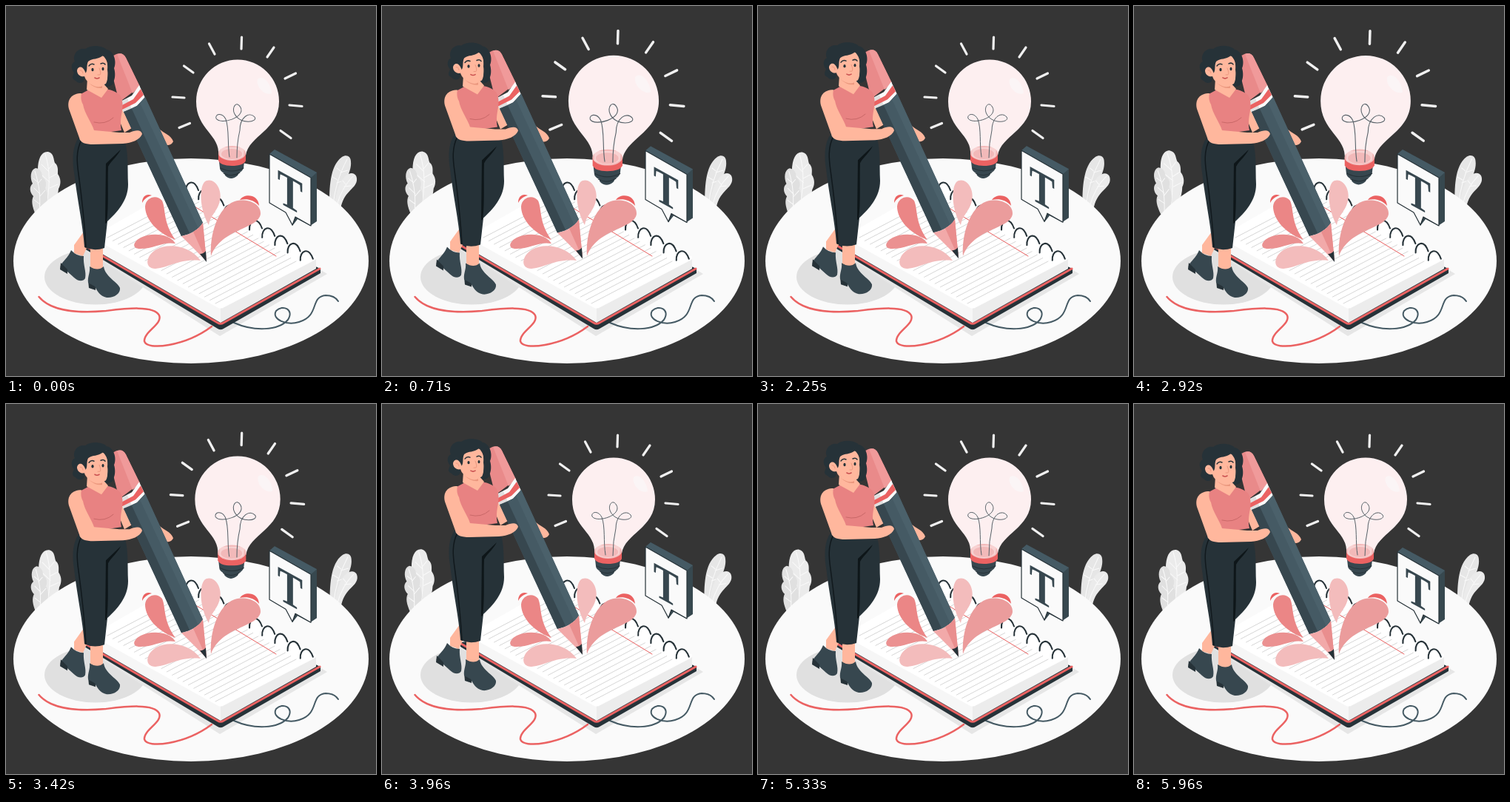
An HTML page that plays this animation: 500x500 px, repeating every 6000 ms.

```html
<!DOCTYPE html>
<html lang="en">
<head>
<meta charset="utf-8">
<title>Creative writing</title>
<style>
html, body { margin: 0; width: 100%; height: 100%; overflow: hidden; background: #353535; }
svg { display: block; width: 100vw; height: 100vh; }
.line { fill: none; stroke-linecap: round; stroke-linejoin: round; }
.skin { fill: #ffb79d; }
.ink { fill: #263238; }
.red { fill: #eb6262; }
</style>
</head>
<body>
<svg viewBox="0 0 500 500">
  <g id="leftLeaves">
    <path fill="#ebebeb" d="M46 282C40 255 41 238 43 222C43 206 48 196 57 197C65 199 64 207 66 212C71 216 70 222 70 227C75 234 74 242 71 247C70 262 62 274 56 282Z"/>
    <path class="line" stroke="#fafafa" d="M53 200C60 222 60 245 53 278M58 220L64 213M59 232L68 227M59 246L70 241M58 224L48 214M59 238L48 228"/>
    <path fill="#e0e0e0" d="M40 282C35 270 34 263 37 257C32 252 31 244 36 240C32 232 33 221 40 219C47 220 49 226 49 231C55 235 55 242 53 246C58 253 57 268 50 282Z"/>
    <path class="line" stroke="#fafafa" d="M39 223C45 242 47 257 45 280M43 238L37 233M43 240L48 234M46 254L38 246M46 257L53 249M46 268L38 262"/>
  </g>
  <g id="rightLeaves">
    <path fill="#e6e6e6" d="M437 270C437 248 437 216 454 204C460 200 466 203 466 210C468 226 452 244 448 272Z"/>
    <path class="line" stroke="#fafafa" d="M461 207C450 228 444 248 442 270M452 223L447 219M448 235L441 231M452 225L462 222M447 239L456 236"/>
    <path fill="#ebebeb" d="M443 275C446 250 452 232 463 227C470 224 475 229 474 236C472 248 456 250 452 275Z"/>
    <path class="line" stroke="#fafafa" d="M469 230C458 241 451 255 447 270M459 241L455 236M457 244L466 243"/>
  </g>

  <ellipse cx="250" cy="344.500" rx="240" ry="138.500" fill="#fafafa"/>
  <ellipse cx="121" cy="366" rx="69" ry="37.500" fill="#e0e0e0"/>
  <path fill="#e6e6e6" d="M106 330L289 446L434 362L414 350Z"/>
  <path class="line" stroke="#eb6262" stroke-width="2.500" d="M44.500 393C62 414 100 415 135 412C160 409 200 404 207 418C212 430 186 440 187 453C190 466 242 460 278 433"/>
  <path class="line" stroke="#455a64" stroke-width="2" d="M308 428C335 440 368 439 381 424C390 410 374 403 365 412C358 424 380 432 396 427C425 418 410 393 432 391Q444 391 449 399"/>

  <path class="ink" d="M106 322V328L286 436Q290 438.500 294 436L425 361V355L300 300Z"/>
  <path class="line" stroke="#eb6262" stroke-width="3" d="M107 324L286 428Q290 430.500 294 428L424 355"/>
  <path fill="#f6f6f6" d="M116 311L290 408V428L118 328Q114 325 116 311Z"/>
  <path fill="#ececec" d="M290 408L419 341V355L290 428Z"/>
  <path fill="#fff" d="M116 312L242 240Q247 237 252 240L417 337Q421 340 418 343L295 407Q290 410 285 407L118 314Z"/>
  <g id="rules" class="line" stroke="#d2d2d2" stroke-width=".9"></g>
  <path class="line" stroke="#eb6262" d="M240 262L365 338"/>
  <g id="rings" class="line" stroke="#263238" stroke-width="2.100"></g>

  <path fill="#eb9c9c" d="M277 338C275 309 286 272 309 264C326 259 345 267 344 281C341 302 291 300 277 338Z"/>
  <path class="red" d="M316 262C322 253 341 254 342 270C335 262 326 260 316 262Z"/>
  <path fill="#f3bcbc" d="M274 296C261 275 260 240 271 236C284 232 294 251 288 267C284 279 276 283 274 296Z"/>
  <path fill="#eb8686" d="M229 316C200 305 188 285 188 271C189 258 204 254 211 263C216 274 212 293 229 316Z"/>
  <path class="red" d="M184 266C184 257 190 253 197 256C190 258 187 261 184 266Z"/>
  <path fill="#eb9191" d="M229 321C221 307 196 306 182 313C171 319 170 328 181 328C201 328 211 318 229 321Z"/>
  <path fill="#f3bcbc" d="M263 344C250 325 220 319 203 329C188 338 187 355 202 355C222 353 235 341 263 344Z"/>

  <g id="bulb">
    <path class="line" stroke="#f0f0f0" stroke-width="3.200" d="M318.500 42L318 58M274.500 51L282 65M362 56L353 69M240.500 81L253 90M391.500 91L377 98M225 123L241 124M383 134L400 135.500M234 164.500L248.500 158.500M371 168.500L385 178.500"/>
    <path fill="#fdeff0" d="M287 202C290 174 257 167 257 129A56 56.500 0 0 1 369 129C369 168 328 175 324 202Z"/>
    <path fill="#fbf5f6" d="M340 99C348 92 358 106 359 118C350 122 337 109 340 99Z"/>
    <path fill="#37474f" d="M288 210H322L321 219Q319 224 315 225L313 229Q304 237 296 229L295 226Q289 223 289 219Z"/>
    <path class="line" stroke="#263238" d="M290 219Q305 227 321 219M294 226Q305 232 316 225"/>
    <path class="red" d="M287 199V209Q290 216 305 216Q321 216 324 209V199Z"/>
    <ellipse cx="305.500" cy="199" rx="18.500" ry="10" fill="#f3b9b9"/>
    <ellipse cx="305" cy="200" rx="14" ry="7" fill="#e88b8b"/>
    <path fill="#fdeff0" opacity=".45" d="M289 191H322L321 203Q305 213 289 203Z"/>
    <path class="line" stroke="#566168" d="M302 204C299 186 302 166 297 153C292 143 282 146 284 152C290 161 324 151 317 137C312 127 304 137 309 146C317 161 341 157 336 150C329 142 316 150 316 168Q312 185 312 205"/>
  </g>

  <g id="bubble">
    <path fill="#37484f" d="M356 200L363 194L420 225V291L411 297L394 288L387 297L380 282Z"/>
    <path fill="#455a64" d="M356 200L363 194L420 225L412 232Z"/>
    <path fill="#fafafa" stroke="#263238" stroke-width="1.200" stroke-linejoin="round" d="M356 200L412 232V297L391 285L387 296L378 279L356 266Z"/>
    <text transform="matrix(.78 .43 0 1 384 274)" text-anchor="middle" font-family="'Liberation Serif', serif" font-weight="700" font-size="66" fill="#37474f">T</text>
  </g>

  <g id="writer">
    <path class="skin" d="M151 120C160 127 164 145 170 165L160 171L149 145ZM199 165L207 166C213 172 223 174 226 183C224 188 218 189 210 188Z"/>
    <path class="ink" d="M106 60C119 51 139 56 143 68C150 73 151 85 148 91C151 98 146 108 137 109L112 107Z"/>

    <path fill="#e98a8a" d="M140 78Q139 69 149 65Q158 62 162 70L181 109L153 130Z"/>
    <path fill="#f09a9a" d="M150 65Q158 62 162 70L181 109L171 118Z"/>
    <path fill="#fafafa" d="M153 130L170 121L180 107L188 124L177 135L159 144Z"/>
    <path fill="#e0e0e0" d="M153 130L164 125L170 139L159 144Z"/>
    <path class="red" d="M155 135L172 126L182 112L186 120L175 131L157 140Z"/>
    <path fill="#455a64" d="M159 143L177 135L188 123L266 293Q257 307 237 311Z"/>
    <path fill="#37474f" d="M159 143L170 139L248 307L237 311Z"/>
    <path fill="#4b616b" d="M181 131L188 123L266 293L260 301Z"/>
    <path fill="#f2a9a9" d="M237 311Q257 307 266 293L271 345Z"/>
    <path fill="#e98e8e" d="M253 305Q262 300 266 293L271 345Z"/>
    <path class="ink" d="M262 335Q267 335 270 331L271 346Z"/>

    <path class="skin" d="M105 305L92 323V334L104 338L113 318ZM114 322V356Q124 362 131 354V324Z"/>
    <path fill="#37474f" d="M88 330Q95 338 105 338C104 350 109 359 107 368C104 373 97 372 92 367L82 358L74 355C72 347 83 343 88 330Z"/>
    <path class="ink" d="M74 347L83 356V362L73 356ZM111 371L121 376V384L112 381Z"/>
    <path fill="#37474f" d="M113 352Q124 359 132 352C134 366 151 373 154 381C155 389 145 395 136 394C127 392 123 385 120 379L111 374C110 365 114 361 113 352Z"/>
    <path class="ink" d="M98 178L159 178C166 195 164 219 165 241C165 263 150 279 137 291L133 327Q119 332 106 326C104 296 96 260 92 225C89 206 90 190 98 178Z"/>
    <path class="line" stroke="#11191d" stroke-width="1.500" d="M102 181C94 196 96 213 98 227C102 256 106 291 108 326"/>
    <path fill="#0e1619" d="M155 194C150 204 143 208 138 217C137 240 139 270 136 293L134 294L135 213Z"/>

    <path fill="#e88282" d="M101 119L114 112H131C140 112 151 116 155 122C162 138 152 148 156 168Q130 173 103 169C107 152 99 137 101 119Z"/>
    <path class="line" stroke="#c96868" d="M119 157Q134 161 145 151"/>
    <path class="skin" d="M102 118C89 118 82 126 85 139L99 178C100 185 108 187 118 187L158 186C170 185 181 181 184 173C183 167 176 167 167 171L153 171L119 168C116 158 106 145 104 133C101 128 101 122 102 118ZM110 98L109 113L129 124L138 112L130 103Z"/>
    <path fill="#eb987f" d="M112 104Q123 112 130 108L130 111Q120 112 112 104Z"/>
    <path class="skin" d="M106 72Q122 61 136 70C138 84 139 98 135 105Q126 111 114 105Q106 100 105 91Z"/>
    <path class="ink" d="M106 96C107 105 98 106 94 101C87 98 91 93 92 90C87 85 88 77 93 75C89 65 98 56 107 58C116 51 132 54 136 59C146 60 150 76 146 84C149 94 147 106 138 108C135 104 139 95 137 86C139 77 135 71 131 67C124 73 117 70 111 75C108 81 111 88 107 91Z"/>
    <path class="skin" d="M107 89C103 79 96 82 96 88C97 95 104 97 109 94Z"/>
    <path class="line" stroke="#eb987f" d="M100 87Q103 86 104 91M126 84Q129 91 127 93L124 93"/>
    <path class="line" stroke="#263238" stroke-width="1.500" d="M112 81Q115 77 119 79M128 78Q132 76 134 79"/>
    <ellipse cx="117" cy="86" rx="1.600" ry="2.200" class="ink"/>
    <ellipse cx="131" cy="85" rx="1.500" ry="2.200" class="ink"/>
    <path class="line" stroke="#c94f4f" stroke-width="1.600" d="M120 97Q123 99 126 97"/>
  </g>
</svg>
<script>
const LOOP = 6000;
const byId = id => document.getElementById(id);
const move = (id, transform) => byId(id).setAttribute('transform', transform);

// Value at loop position p, from [position, value] stops.
function track(stops, p, ease = u => u) {
  const i = Math.max(1, stops.findIndex(s => s[0] >= p));
  const [a, from] = stops[i - 1], [b, to] = stops[i];
  return from + (to - from) * ease((p - a) / (b - a));
}
const smooth = u => (1 - Math.cos(Math.PI * u)) / 2;

const pulse = [[0, 1], [.1, 1.1], [.3, 1], [.4, 1], [.5, 1.1], [.6, 1], [1, 1]];
const wind = [0, -.25, .3, -.95, .6, -1, .45, -.85, .4, -.2, 0].map((v, i) => [i / 10, v]);

function repeat(id, count, path) {
  byId(id).innerHTML = Array.from({ length: count }, (_, i) => `<path d="${path(i)}"/>`).join('');
}
repeat('rules', 21, i => `M${137 + i * 7.3} ${313 + i * 4.45}l109 -57`);
repeat('rings', 10, i => `M${243 + i * 17.2} ${251 + i * 10.3}c-1 -13 11 -19 17 -2`);

function draw(time) {
  const p = (time % LOOP) / LOOP;
  const lift = -9.7 * (1 - Math.cos(4 * Math.PI * p)) / 2;
  move('writer', `translate(0 ${lift})`);
  move('bubble', `translate(0 ${lift})`);
  move('bulb', `translate(313 136.5) scale(${track(pulse, p)}) translate(-313 -136.5)`);

  const sway = track(wind, p, smooth);
  move('leftLeaves', `translate(${4.5 * sway} ${sway}) rotate(${3.2 * sway} 42 276)`);
  move('rightLeaves', `translate(${3.7 * sway} 0) rotate(${sway} 444 270)`);
}

const start = performance.now();
function tick() {
  draw(performance.now() - start);
  requestAnimationFrame(tick);
}
draw(0);
requestAnimationFrame(tick);
</script>
</body>
</html>
```
